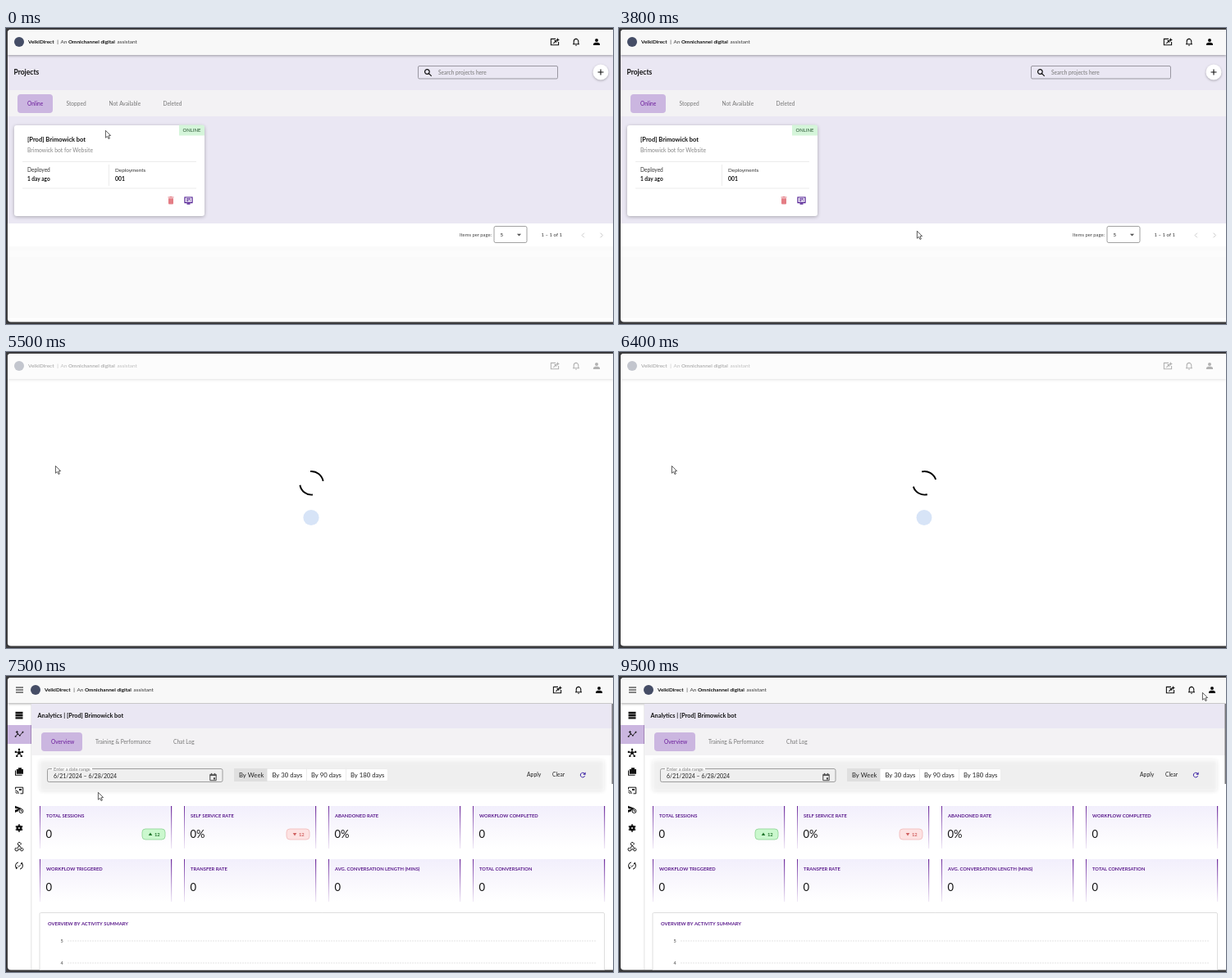
Animation of 740 by 362 pixels, one loop 9600 ms. Source, as an HTML page with a canvas:

```html
<!DOCTYPE html>
<html lang="en">
<head>
<meta charset="utf-8">
<title>Assistant dashboard</title>
<style>
html, body { margin: 0; width: 100%; height: 100%; overflow: hidden; background: #39393b; }
canvas { display: block; width: 740px; height: 362px; }
</style>
</head>
<body>
<canvas id="stage"></canvas>
<script>
const W = 740, H = 362, LOOP = 9600, STEP = 100;
const OPEN = 5500, SHELL = 6600, READY = 7500;
const APP = 'VelkiDirect', BOT = '[Prod] Brimowick bot';
const INK = '#111', GREY = '#777', PURPLE = '#5a1a8c', LILAC = '#cbb6e0', BAND = '#eae7f3', TABS = '#f3f2f4';

const canvas = document.getElementById('stage');
const c = canvas.getContext('2d');
const dpr = window.devicePixelRatio || 1;
canvas.width = W * dpr;
canvas.height = H * dpr;

function rect(x, y, w, h, fill) {
  c.fillStyle = fill;
  c.fillRect(x, y, w, h);
}

function box(x, y, w, h, r, fill, stroke, blur) {
  c.save();
  c.beginPath();
  c.roundRect(x, y, w, h, r);
  if (blur) {
    c.shadowColor = 'rgba(0,0,0,.28)';
    c.shadowBlur = blur * dpr;
    c.shadowOffsetY = dpr;
  }
  if (fill) { c.fillStyle = fill; c.fill(); }
  c.shadowColor = 'transparent';
  if (stroke) { c.strokeStyle = stroke; c.lineWidth = 0.8; c.stroke(); }
  c.restore();
}

function disc(x, y, r, fill) {
  c.beginPath();
  c.arc(x, y, r, 0, Math.PI * 2);
  c.fillStyle = fill;
  c.fill();
}

function line(x1, y1, x2, y2, color, width = 0.8, dash = []) {
  c.save();
  c.setLineDash(dash);
  c.beginPath();
  c.moveTo(x1, y1);
  c.lineTo(x2, y2);
  c.strokeStyle = color;
  c.lineWidth = width;
  c.stroke();
  c.restore();
}

// y is the middle of the capitals
function text(str, x, y, size, color = INK, bold = false, align = 'left') {
  c.font = `${bold ? 700 : 400} ${size}px Lato, "Open Sans", sans-serif`;
  c.textAlign = align;
  c.fillStyle = color;
  c.fillText(str, x, y + size * 0.35);
}

// Icons are drawn around 0,0 as filled and stroked paths
const ICONS = {
  menu: { s: 'M-4.5-3H4.5M-4.5 0H4.5M-4.5 3H4.5', w: 1 },
  screen: { s: 'M1-3.6H-4.6V3.8H4.6V0M-1.6 1.8L1.6-1.4M-.6-1.5H1.8V.8', f: 'M3.6-5L4.3-3.2L6-2.5L4.3-1.8L3.6 0L2.9-1.8L1.2-2.5L2.9-3.2Z', w: 1.1 },
  bell: { s: 'M-4 2.7H4M-2.8 2.6V-.6A2.8 3 0 0 1 2.8-.6V2.6M0-3.6V-4.5', f: 'M-1.1 3.7H1.1A1.1 1.1 0 0 1-1.1 3.7', w: 1.1 },
  person: { f: 'M-2-2A2 2 0 1 1 2-2A2 2 0 1 1-2-2M-4 4V2.7C-4 .2 4 .2 4 2.7V4Z' },
  search: { s: 'M1.7-1A2.8 2.8 0 1 1-3.9-1A2.8 2.8 0 1 1 1.7-1M1.1 1.2L4.2 4.3', w: 1.2 },
  plus: { s: 'M-3.5 0H3.5M0-3.5V3.5', w: 1.1 },
  trash: { f: 'M-3.5-4.5H-1.6L-1-5H1L1.6-4.5H3.5V-3.4H-3.5ZM-3-2.7H3V3.6Q3 4.5 2 4.5H-2Q-3 4.5-3 3.6Z' },
  monitor: { s: 'M-4.5-4H4.5V2.7H-4.5ZM-2.5-1.8H2.5M-2.5.4H.2M1.4.4H2.5M-2 4.2H2', w: 1.2 },
  prev: { s: 'M1.4-2.8L-1.4 0L1.4 2.8', w: 0.9 },
  next: { s: 'M-1.4-2.8L1.4 0L-1.4 2.8', w: 0.9 },
  caret: { f: 'M-2.6-1.2H2.6L0 1.5Z' },
  calendar: { s: 'M-3.7-3.2H3.7V4.2H-3.7ZM-3.7-1.9H3.7M-2-4.6V-3M2-4.6V-3', f: 'M.4.8H2.5V2.9H.4Z', w: 1 },
  refresh: { s: 'M2.7-1A2.8 2.8 0 1 0 2.7 1.2', f: 'M3.6-3.5V-.2H.3Z', w: 1 },
  servers: { f: 'M-4.5-4.2H4.5V-1.6H-4.5ZM-4.5-1H4.5V1.6H-4.5ZM-4.5 2.2H4.5V4.6H-4.5Z' },
  insights: { s: 'M-4.5 3L-1.6-.2L.8 1.8L4.5-2.4', f: 'M-5.2 2.2H-3.6V3.8H-5.2ZM-2.4-1H-.8V.6H-2.4ZM0 1H1.6V2.6H0ZM3.7-3.2H5.3V-1.6H3.7ZM-2.6-4.4L-2-3L-.6-2.4L-2-1.8L-2.6-.6L-3.2-1.8L-4.6-2.4L-3.2-3Z', w: 0.9 },
  hub: { s: 'M0 0V-4M0 0L-4-1.2M0 0L4-1.2M0 0L-2.7 3.7M0 0L2.7 3.7', f: 'M-1.8-1.8H1.8V1.8H-1.8ZM-1.1-5.2H1.1V-3H-1.1ZM-5.2-2.2H-3V0H-5.2ZM3-2.2H5.2V0H3ZM-3.8 2.8H-1.6V5H-3.8ZM1.6 2.8H3.8V5H1.6Z', w: 1 },
  work: { f: 'M-3.2-3H-1V-4.7H3V-3H5V2.8H-3.2ZM-5-1.4H-4V3.7H3.6V4.7H-5Z' },
  cast: { s: 'M-4.5-1.5V-3.8H4.7V3.8H1.5M-4.6 0A4 4 0 0 1-.7 4M-4.6 2A2 2 0 0 1-2.7 4', f: 'M0-2H3V0H0Z', w: 1 },
  send: { s: 'M4.9 2.2A2.4 2.4 0 1 1 .1 2.2A2.4 2.4 0 1 1 4.9 2.2M2.5 1V2.4H3.5', f: 'M-5-4.3L4-.8C1-1-1 .7-1 2.2L-5 4V.8L-.8-.2L-5-1.2Z', w: 1 },
  gear: { s: 'M1.7 0A1.7 1.7 0 1 1-1.7 0A1.7 1.7 0 1 1 1.7 0M0-4.8V-2.5M0 2.5V4.8M-4.2-2.4L-2.2-1.3M2.2 1.3L4.2 2.4M-4.2 2.4L-2.2 1.3M2.2-1.3L4.2-2.4M2.8 0A2.8 2.8 0 1 1-2.8 0A2.8 2.8 0 1 1 2.8 0', w: 1.6 },
  webhook: { s: 'M-2.6 2.5L0-1.8A1.9 1.9 0 1 1 1.8-2.5M.2-2L2.4 1.5A1.8 1.8 0 1 1 1.5 3.8M3 2.9H-1A2 2 0 1 1-3.2 1', w: 1 },
  sync: { s: 'M-1-4.2A4.3 4.3 0 0 0-3 3.2M1 4.2A4.3 4.3 0 0 0 3-3.2M-1.6 0L-.4 1.2L1.8-1', f: 'M-4.6 1.4L-1.5 2L-3.6 4.5ZM4.6-1.4L1.5-2L3.6-4.5Z', w: 1 }
};

function icon(name, x, y, color = INK) {
  const { s, f, w } = ICONS[name];
  c.save();
  c.translate(x, y);
  c.fillStyle = c.strokeStyle = color;
  if (f) c.fill(new Path2D(f));
  if (s) { c.lineWidth = w; c.stroke(new Path2D(s)); }
  c.restore();
}

function header(dx) {
  c.save();
  c.shadowColor = 'rgba(0,0,0,.35)';
  c.shadowBlur = 3 * dpr;
  c.shadowOffsetY = dpr;
  rect(2, 2, 738, 31, '#f8f8f8');
  c.restore();
  if (dx) icon('menu', 16.5, 17);
  disc(16 + dx, 17, 6, '#454d66');
  text(APP, 27 + dx, 17, 6.4, INK, true);
  text('|', 62.3 + dx, 17, 6.4);
  text('An', 66.5 + dx, 17, 6.4, '#333');
  text('Omnichannel digital', 76 + dx, 17, 6.4, INK, true);
  text('assistant', 135.5 + dx, 17, 6.4, '#333');
  const off = dx ? 3 : 0;
  icon('screen', 669 + off, 17);
  icon('bell', 695 + off, 17);
  icon('person', 720 + off, 17);
}

function tabs(y, active, w, items) {
  const [first, ...rest] = items;
  box(first[1] - active, y - 11.5, w, 23, 4, LILAC, null, 0);
  text(first[0], first[1], y, 6.6, '#6a1b9a');
  for (const [label, x] of rest) text(label, x, y, 6.6, GREY);
}

function projects() {
  rect(2, 33, 738, 206, BAND);
  rect(2, 76, 738, 32, TABS);
  rect(2, 239, 738, 28, '#fff');
  rect(2, 267, 738, 88, '#fafafa');
  rect(2, 272, 738, 8, '#fcfcfc');
  header(0);
  text('Projects', 9.5, 54.5, 8.5, INK, true);
  box(502.5, 46.5, 170, 15.5, 1.5, null, '#85838c');
  icon('search', 514.5, 54.5);
  text('Search projects here', 527, 54.5, 6.6, GREY);
  box(715.5, 44.5, 19, 19, 9.5, '#fff', null, 3);
  icon('plus', 725, 54);
  tabs(92.5, 12, 43, [['Online', 26], ['Stopped', 73.5], ['Not Available', 125.5], ['Deleted', 191.5]]);

  box(10, 119, 232, 111, 3, '#fff', null, 4);
  box(211, 118.5, 31, 13, [0, 3, 0, 0], '#d5f5da');
  text('ONLINE', 226.5, 125, 5.9, '#24512d', false, 'center');
  text(BOT, 26, 136.5, 7.5, INK, true);
  text('Brimowick bot for Website', 26, 150, 6.8, '#868686');
  line(20, 163.5, 232, 163.5, '#e8e8e8');
  line(20, 196, 232, 196, '#e8e8e8');
  line(125.5, 167, 125.5, 193, '#e8e8e8');
  text('Deployed', 26, 174, 6.6, '#333');
  text('1 day ago', 26, 185, 6.5, INK, true);
  text('Deployments', 133, 174, 6.4, '#333');
  text('001', 133, 185, 6.8, INK, true);
  icon('trash', 201, 211, '#e47d85');
  icon('monitor', 222.5, 211, '#4f1b91');

  text('Items per page:', 553, 253, 5.8, '#444');
  box(595, 242.5, 40, 20, 2, null, '#8a8a8a');
  text('5', 602.5, 253, 6.2, '#222');
  icon('caret', 625.5, 253, '#555');
  text('1 – 1 of 1', 652.5, 253, 6, '#333');
  icon('prev', 703.5, 253.5, '#c4c4c4');
  icon('next', 726, 253.5, '#c4c4c4');
}

function panel(x, y, w, h, title) {
  box(x, y, w, h, 1.5, '#fff', '#d6d6d6');
  text(title, x + 10, y + 13.5, 5.8, PURPLE, true);
}

function frame() {
  header(20);
  const side = ['servers', 'insights', 'hub', 'work', 'cast', 'send', 'gear', 'webhook', 'sync'];
  rect(2, 60, 28.5, 23, LILAC);
  rect(30, 60, 1, 23, PURPLE);
  side.forEach((name, i) => icon(name, 16, 48 + i * 23));
  line(30.8, 34, 30.8, 359, '#dedede');
  rect(31, 34, 709, 30, BAND);
  rect(31, 64, 709, 33, TABS);
  text('Analytics | ' + BOT, 38.5, 48.5, 7.3, INK, true);
  tabs(80.5, 12, 50, [['Overview', 55], ['Training & Performance', 109], ['Chat Log', 204]]);

  box(41, 102, 688, 38, 2, '#fff', null, 0);
  c.save();
  c.globalAlpha = 0.35;
  box(41, 102, 688, 38, 2, '#fff', null, 5);
  c.restore();
  box(50.5, 113.5, 213.5, 16, 2, null, '#8a8a8a');
  rect(56, 112, 49, 3, '#fff');
  text('Enter a date range', 58, 114.5, 5.6, GREY);
  text('6/21/2024 – 6/28/2024', 58, 123, 7, '#222');
  icon('calendar', 252.5, 123.5, '#444');
  box(278.5, 113.5, 187, 15, 1.5, '#fff', '#ebebeb');
  rect(278, 113, 40.5, 16, '#dfdfdf');
  line(366.5, 113.5, 366.5, 128.5, '#e8e8e8');
  line(414.5, 113.5, 414.5, 128.5, '#e8e8e8');
  [['By Week', 284], ['By 30 days', 324.5], ['By 90 days', 372], ['By 180 days', 420]]
    .forEach(([label, x]) => text(label, x, 121, 7.7, '#222'));
  text('Apply', 635, 121, 6.8, '#222');
  text('Clear', 666, 121, 6.6, '#222');
  icon('refresh', 703, 121, '#3b22a5');
}

function stat(i, label, value) {
  const x = 41 + (i % 4) * 176, y = i < 4 ? 159 : 224;
  const fill = c.createLinearGradient(0, y, 0, y + 52);
  fill.addColorStop(0, '#f2effc');
  fill.addColorStop(0.5, '#f9f7fd');
  fill.addColorStop(1, '#fff');
  rect(x, y, 161, 52, fill);
  const edge = c.createLinearGradient(0, y, 0, y + 52);
  edge.addColorStop(0, '#6d2a9c');
  edge.addColorStop(1, 'rgba(150,100,190,.15)');
  rect(x, y, 1, 52, edge);
  rect(x + 160, y, 1.2, 52, edge);
  text(label, x + 8, y + 12, 5.8, PURPLE, true);
  text(value, x + 7.5, y + 34, 13, INK);
}

function badge(x, up) {
  box(x, 187, 28, 13, 4, up ? '#cbf8ce' : '#fde2e2', up ? '#8bd294' : '#f0b9b9');
  const color = up ? '#20752c' : '#d06060';
  c.save();
  c.translate(x + 10, 193.5);
  if (up) c.rotate(Math.PI);
  c.fillStyle = color;
  c.fill(new Path2D('M-2.3-1.6H2.3L0 2Z'));
  c.restore();
  text('12', x + 15, 193.5, 5.8, color, true);
}

function analytics() {
  frame();
  ['TOTAL SESSIONS', 'SELF SERVICE RATE', 'ABANDONED RATE', 'WORKFLOW COMPLETED', 'WORKFLOW TRIGGERED',
    'TRANSFER RATE', 'AVG. CONVERSATION LENGTH (MINS)', 'TOTAL CONVERSATION']
    .forEach((label, i) => stat(i, label, i === 1 || i === 2 ? '0%' : '0'));
  badge(166, true);
  badge(342, false);
  panel(41, 289.5, 688.5, 90, 'OVERVIEW BY ACTIVITY SUMMARY');
  [['5', 324], ['4', 351]].forEach(([n, y]) => {
    text(n, 66.5, y, 5.5, '#444');
    line(75, y, 720, y, '#d9d9d9', 0.7, [2, 1]);
  });
  rect(738.5, 34, 1.5, 98, '#77777a');
}

function shell() {
  frame();
  panel(41, 160, 688.5, 30, 'OVERVIEW BY ACTIVITY SUMMARY');
  panel(41, 205, 337, 31, 'SESSION DISTRIBUTION BY CHANNEL');
  panel(392.5, 205, 337, 31, 'MOST ACTIVE HOURS');
  panel(41, 250.5, 688.5, 40, 'ENGAGEMENT ANALYSIS');
  line(33, 317, 738, 317, '#e4e4e4');
}

function veil(alpha) {
  rect(2, 2, 738, 357, `rgba(255,255,255,${alpha})`);
}

function spinner(x, t) {
  const turn = (t - OPEN) / 920 * Math.PI * 2 - 1.67;
  c.strokeStyle = '#000';
  c.lineWidth = 1.9;
  for (const a of [turn, turn + Math.PI]) {
    c.beginPath();
    c.arc(x, 160.3, 14.3, a, a + 1.5);
    c.stroke();
  }
}

// Pointer runs as [time, x, y]; each run starts with a hard jump
const RUNS = [
  [[0, 121, 125], [300, 104, 148], [600, 52, 159], [800, 37, 155], [1100, 60, 158], [1500, 78, 153], [2000, 67, 143]],
  [[3500, 363, 248], [3800, 363, 248], [4200, 210, 185], [4700, 68, 129], [4800, 68, 129], [5100, 60, 138], [5300, 60, 139],
    [5500, 60, 139], [6400, 64, 139], [6900, 77, 137], [7500, 112, 142], [7900, 178, 156], [8400, 351, 181],
    [8800, 570, 112], [9100, 685, 42], [9300, 710, 20], [9500, 711, 20]]
];

function pointerAt(t) {
  const run = t < RUNS[1][0][0] ? RUNS[0] : RUNS[1];
  const last = run.length - 1;
  if (t >= run[last][0]) return run[last].slice(1);
  const i = run.findIndex((k, n) => n < last && t < run[n + 1][0]);
  const a = run[i], b = run[i + 1], span = b[0] - a[0], u = (t - a[0]) / span;
  const slope = (n, d) => {
    if (n === 0 || n === last) return 0;
    const p = run[n - 1], k = run[n], q = run[n + 1];
    if ((k[d] - p[d]) * (q[d] - k[d]) <= 0) return 0;
    return (q[d] - p[d]) / (q[0] - p[0]);
  };
  return [1, 2].map(d =>
    a[d] * (1 + 2 * u) * (1 - u) ** 2 + b[d] * u * u * (3 - 2 * u) +
    span * u * (1 - u) * (slope(i, d) * (1 - u) - slope(i + 1, d) * u));
}

const ARROW = new Path2D('M.4.3V9.2L2.5 7.4L4 10.5L5.4 9.9L4 6.8L6.6 6.5Z');

function pointer(t) {
  const [x, y] = pointerAt(t);
  c.save();
  c.translate(x, y);
  c.fillStyle = '#fff';
  c.strokeStyle = '#333';
  c.lineWidth = 0.8;
  c.fill(ARROW);
  c.stroke(ARROW);
  c.restore();
}

function draw(t) {
  c.setTransform(dpr, 0, 0, dpr, 0, 0);
  rect(0, 0, W, H, '#39393b');
  c.save();
  c.beginPath();
  c.roundRect(2, 2, 742, 357.5, 4);
  c.clip();
  rect(0, 0, W, H, '#fff');
  if (t < OPEN) {
    projects();
  } else if (t < SHELL) {
    header(0);
    veil(0.68);
    const beat = Math.cos((t - OPEN) / 500 * Math.PI);
    disc(372, 202.5, 8.7 + beat * 0.9, '#d7e4f7');
    spinner(372.5, t);
  } else if (t < READY) {
    shell();
    veil(0.66);
    spinner(371, t);
  } else {
    analytics();
  }
  pointer(t);
  c.restore();
}

const start = performance.now();
function tick() {
  const t = (performance.now() - start) % LOOP;
  draw(Math.floor(t / STEP) * STEP);
  requestAnimationFrame(tick);
}
tick();
</script>
</body>
</html>
```
